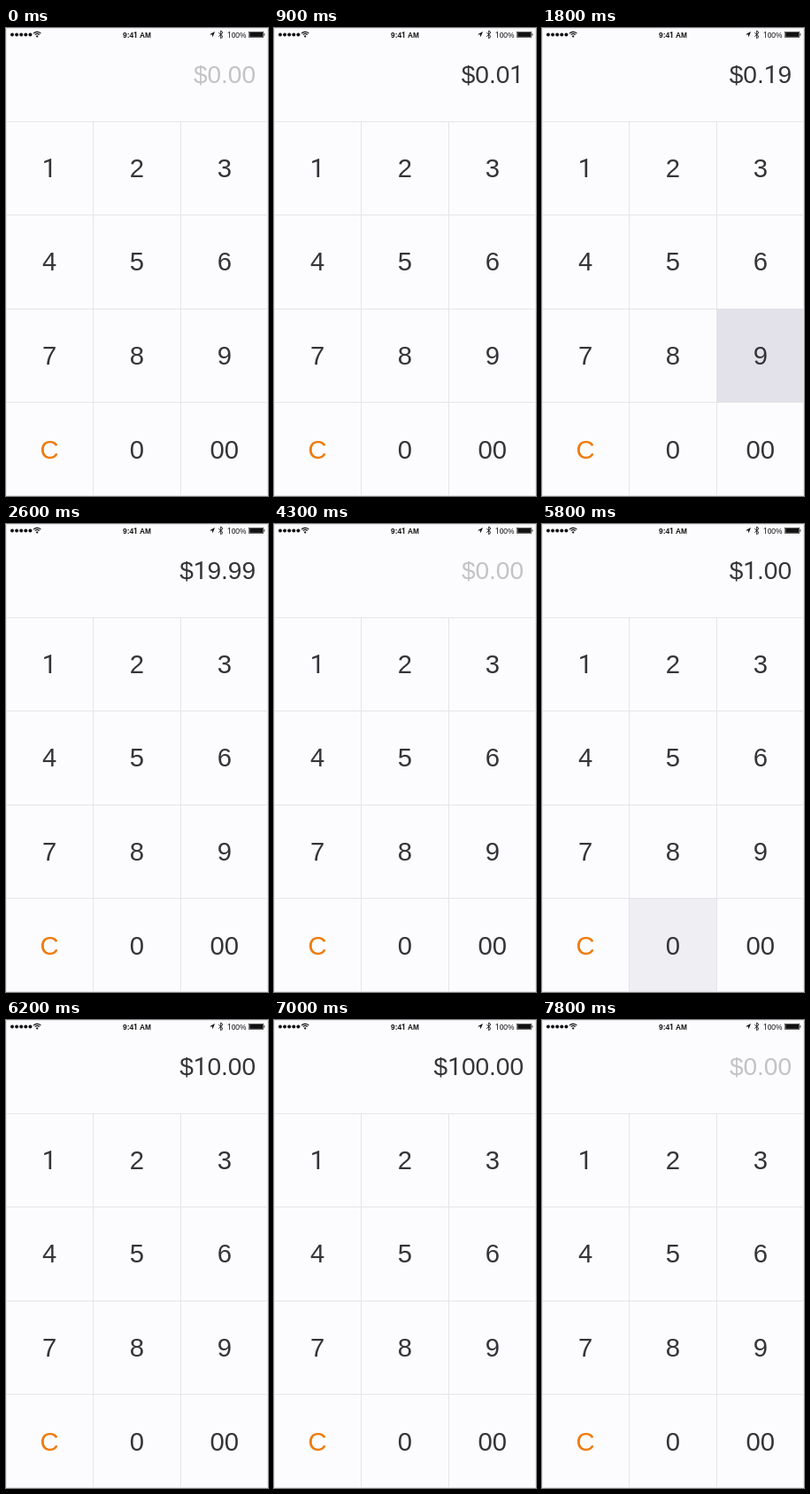
An HTML page with a canvas that plays this animation: 296x527 px, repeating every 8 s.

```html
<!DOCTYPE html>
<html lang="en">
<head>
<meta charset="utf-8">
<title>Keypad</title>
<style>
  html, body { margin: 0; width: 100%; height: 100%; overflow: hidden; background: #fcfcfe; }
  canvas { display: block; width: 296px; height: 527px; }
</style>
</head>
<body>
<canvas id="stage"></canvas>
<script>
const W = 296, H = 527, LOOP = 8000, STEP = 100;
const INK = '#353438', FAINT = '#c3c3c5', LINE = '#e5e5e8', ORANGE = '#ee7a0a';
const KEYS = [['1', '2', '3'], ['4', '5', '6'], ['7', '8', '9'], ['C', '0', '00']];
const COLS = [0, 98, 197, 296], ROWS = [105, 210, 316, 421, 527];
const CENTERS = [49, 147.8, 246.8], FIRST_BASELINE = 167.8, ROW_HEIGHT = 105.6;

// When each key goes down, and how many steps its highlight lasts
const PRESSES = [
  [600, '1', 2], [1200, '9', 2], [1800, '9', 1], [2200, '9', 2], [3300, 'C', 2],
  [4800, '1', 2], [5300, '0', 2], [5700, '0', 2], [6000, '0', 2], [6400, '0', 2], [7500, 'C', 2]
];

const canvas = document.getElementById('stage');
const ctx = canvas.getContext('2d');
const ratio = window.devicePixelRatio || 1;
canvas.width = W * ratio;
canvas.height = H * ratio;
ctx.scale(ratio, ratio);

// The digit 1 needs a face without a foot
function setFont(ch, size, weight) {
  const family = ch === '1' ? 'Roboto' : '"Liberation Sans"';
  ctx.font = `${weight} ${size}px ${family}, sans-serif`;
}

// anchor: 0 = left, 0.5 = centre, 1 = right
function write(text, x, y, size, color, anchor, weight = 400) {
  const widths = [...text].map(ch => {
    setFont(ch, size, weight);
    return ctx.measureText(ch).width;
  });
  x -= anchor * widths.reduce((a, b) => a + b, 0);
  ctx.fillStyle = color;
  [...text].forEach((ch, i) => {
    setFont(ch, size, weight);
    ctx.fillText(ch, x, y);
    x += widths[i];
  });
}

function disc(x, y, r) {
  ctx.beginPath();
  ctx.arc(x, y, r, 0, Math.PI * 2);
  ctx.fill();
}

function path(points) {
  ctx.beginPath();
  points.forEach(([x, y]) => ctx.lineTo(x, y));
}

function drawStatus() {
  ctx.fillStyle = ctx.strokeStyle = '#111';
  for (let i = 0; i < 5; i++) disc(7 + i * 5.1, 7.4, 2);

  ctx.lineWidth = 1.2;
  for (const r of [3.4, 5.7]) {
    ctx.beginPath();
    ctx.arc(35.2, 10, r, -Math.PI * 0.76, -Math.PI * 0.24);
    ctx.stroke();
  }
  disc(35.2, 9.4, 1.1);

  path([[236, 4], [233.4, 10.6], [233, 7.6], [230, 7.2]]);
  ctx.fill();

  ctx.lineWidth = 0.9;
  path([[240.3, 5.2], [245, 9.6], [242.7, 11.8], [242.7, 3], [245, 5.2], [240.3, 9.6]]);
  ctx.stroke();

  ctx.lineWidth = 0.6;
  ctx.strokeRect(274.6, 4.3, 16.2, 6.2);
  ctx.fillRect(275.2, 4.9, 15, 5);
  ctx.fillRect(291.4, 6.2, 0.9, 2.4);

  write('9:41 AM', 148, 10.8, 8.3, '#111', 0.5, 700);
  write('100%', 250, 10.8, 8.4, '#111', 0);
}

function drawGrid() {
  ctx.fillStyle = LINE;
  for (const y of ROWS.slice(0, 4)) ctx.fillRect(0, y, W, 1);
  for (const x of COLS.slice(1, 3)) ctx.fillRect(x, ROWS[0], 1, H - ROWS[0]);
  ctx.strokeStyle = LINE;
  ctx.lineWidth = 1;
  ctx.strokeRect(0.5, 0.5, W - 1, H - 1);
}

function drawHighlight(key, alpha) {
  const row = KEYS.findIndex(r => r.includes(key)), col = KEYS[row].indexOf(key);
  ctx.globalAlpha = alpha;
  ctx.fillStyle = '#e3e2ea';
  ctx.fillRect(COLS[col], ROWS[row], COLS[col + 1] - COLS[col], ROWS[row + 1] - ROWS[row]);
  ctx.globalAlpha = 1;
}

function draw(t) {
  ctx.fillStyle = '#fcfcfe';
  ctx.fillRect(0, 0, W, H);
  drawGrid();

  let cents = 0;
  for (const [at, key, steps] of PRESSES) {
    const age = Math.floor((t - at) / STEP);
    if (age >= 1) cents = key === 'C' ? 0 : cents * 10 + Number(key);
    if (age >= 0 && age < steps) drawHighlight(key, age ? 0.5 : 1);
  }

  KEYS.forEach((row, r) => row.forEach((key, c) =>
    write(key, CENTERS[c], FIRST_BASELINE + r * ROW_HEIGHT, 29.2, key === 'C' ? ORANGE : INK, 0.5)));
  write('$' + (cents / 100).toFixed(2), 282, 62, 28, cents ? INK : FAINT, 1);
  drawStatus();
}

function frame(now) {
  draw(now % LOOP);
  requestAnimationFrame(frame);
}
draw(0);
requestAnimationFrame(frame);
</script>
</body>
</html>
```
